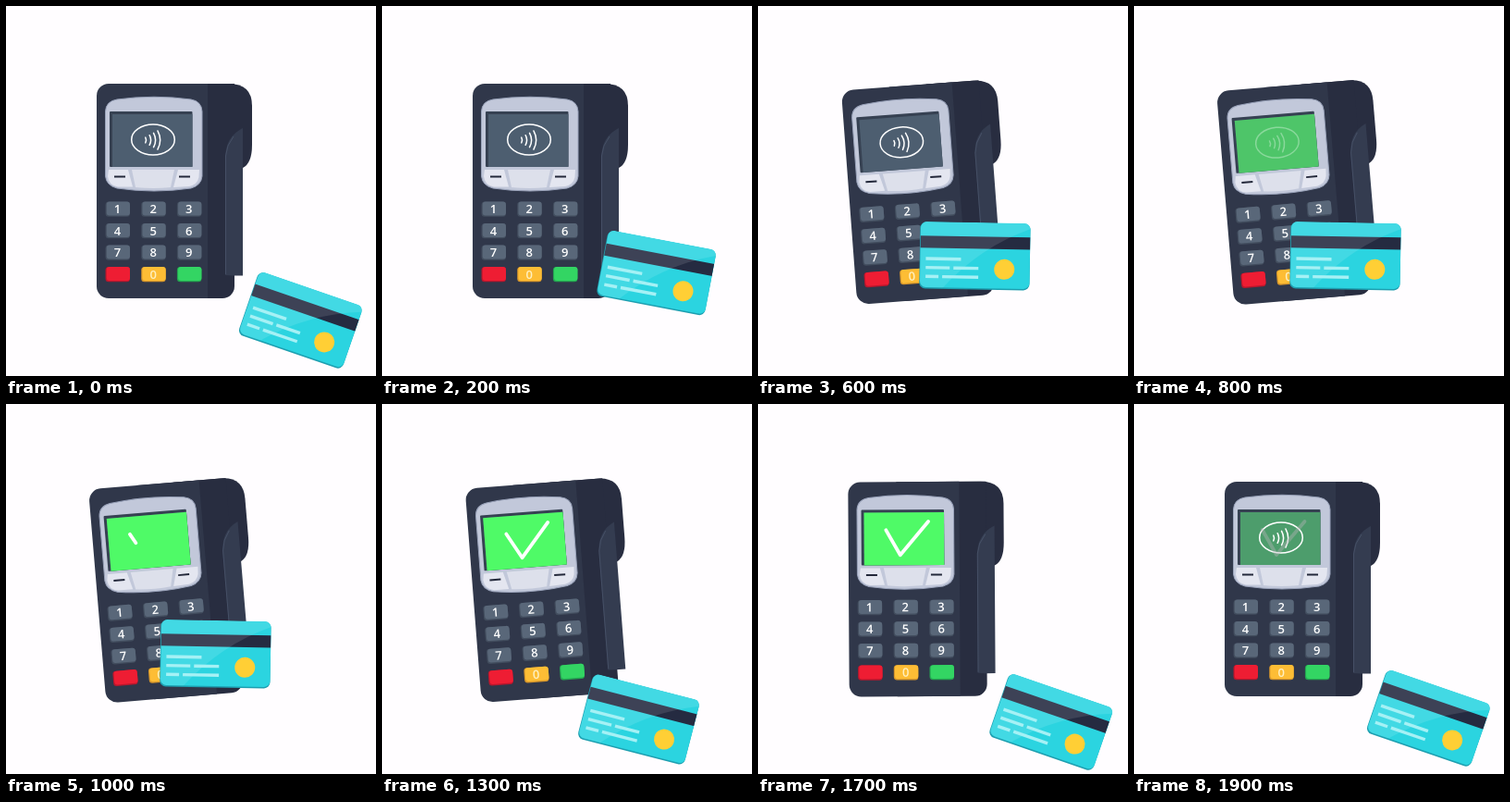
These frames come from a looping animation (400 by 400 pixels, 2000 ms). An HTML page with a canvas:

```html
<!DOCTYPE html>
<html lang="en">
<head>
<meta charset="utf-8">
<title>Card payment</title>
<style>
  html, body { margin: 0; width: 100%; height: 100%; overflow: hidden; background: #fffdff; }
  canvas { display: block; width: 400px; height: 400px; }
</style>
</head>
<body>
<canvas id="stage"></canvas>
<script>
const LOOP = 2000, STEP = 100;
const canvas = document.getElementById('stage');
const ctx = canvas.getContext('2d');
const ratio = window.devicePixelRatio || 1;
canvas.width = canvas.height = 400 * ratio;

const rad = deg => deg * Math.PI / 180;
const span = (t, from, to) => Math.max(0, Math.min(1, (t - from) / (to - from)));
const smooth = u => u * u * (3 - 2 * u);
const easeOut = (u, power) => 1 - (1 - u) ** power;
const mix = (a, b, u) => a + (b - a) * u;

// The card swings in, drifts left over the keypad, then drops back past its rest height
function cardPose(t) {
  if (t < 1000) {
    const u = span(t, 0, 600);
    return {
      x: mix(318.5, 234.5, smooth(u)) - 8 * smooth(span(t, 600, 900)),
      y: mix(339.5, 270, easeOut(u, 3.3)),
      angle: mix(19, 1, easeOut(u, 1.5))
    };
  }
  return {
    x: mix(226.5, 318.5, easeOut(span(t, 1050, 1800), 2)),
    y: mix(270, 339.5, smooth(span(t, 1000, 1300))) + 5 * Math.sin(Math.PI * span(t, 1250, 1900)),
    angle: mix(1, 19, easeOut(span(t, 1000, 1600), 2))
  };
}

const terminalTilt = t => -4.8 * (smooth(span(t, 200, 700)) - smooth(span(t, 1200, 1800)));

function box(x, y, w, h, r, fill) {
  ctx.beginPath();
  ctx.roundRect(x, y, w, h, r);
  ctx.fillStyle = fill;
  ctx.fill();
}

function shape(d, fill, edge) {
  const path = new Path2D(d);
  ctx.fillStyle = fill;
  ctx.fill(path);
  if (!edge) return;
  ctx.strokeStyle = edge;
  ctx.lineWidth = 1;
  ctx.stroke(path);
}

function line(points, color, width, cap = 'butt') {
  ctx.beginPath();
  points.forEach(([x, y]) => ctx.lineTo(x, y));
  ctx.strokeStyle = color;
  ctx.lineWidth = width;
  ctx.lineCap = cap;
  ctx.lineJoin = 'round';
  ctx.stroke();
}

function drawBody() {
  shape('M190 84H241Q266 84 266 108V150Q266 170 256 175H190Z', '#282d40');
  box(150, 84, 97, 232, [0, 0, 13, 0], '#282d40');
  box(98, 84, 120, 232, [13, 0, 0, 13], '#30374a');
  shape('M237 291V165Q237 141 256 132V291.5H246Z', '#343c50');
  line([[237.5, 290], [237.5, 162], [240, 151], [246, 141]], '#465066', 1);
}

function drawHousing() {
  shape('M107.5 114Q108 103 120 101Q160 95.5 200 101Q211.5 103 212 114V184Q211 194 200 197Q160 203 120 197Q108.5 194 107.5 184Z',
    '#c2c8da', '#9aa3ba');
  shape('M111 177H132L137 195.5H121Q111 194 110 184Z', '#e4e6f0');
  shape('M136 177H182L178 196Q160 198 140 196Z', '#dde0eb');
  shape('M186 177H209L208.5 185Q207 193 198 195L181 196Z', '#e4e6f0');
  for (const x of [117, 187]) line([[x, 184.5], [x + 12, 184.5]], '#23283a', 2);
}

function drawIcon(alpha) {
  ctx.globalAlpha = alpha;
  ctx.strokeStyle = '#fff';
  ctx.lineCap = 'round';
  ctx.lineWidth = 1.5;
  ctx.beginPath();
  ctx.ellipse(159, 144.5, 23.3, 16.4, 0, 0, 7);
  ctx.stroke();
  for (let i = 0; i < 4; i++) {
    ctx.beginPath();
    ctx.arc(145.5, 145, 6 + i * 5, -0.5, 0.5);
    ctx.stroke();
  }
  ctx.globalAlpha = 1;
}

function drawCheck(progress, alpha) {
  if (progress <= 0) return;
  const turn = 0.395;
  const down = Math.min(1, progress / turn), up = span(progress, turn, 1);
  const points = [[138.7, 136], [mix(138.7, 154, down), mix(136, 163, down)]];
  if (up > 0) points.push([mix(154, 184.5, up), mix(163, 127, up)]);
  ctx.globalAlpha = alpha;
  line(points, alpha < 1 ? '#b9b4b8' : '#fff', 3.8, 'round');
  ctx.globalAlpha = 1;
}

function drawScreen(t) {
  const green = t < 1000 ? span(t, 600, 900) : 1 - span(t, 1780, 1980);
  box(112, 114, 89.5, 60, 1, '#364152');
  box(115, 117, 86.5, 57, 0, '#4d5e70');
  ctx.globalAlpha = green;
  box(115, 117, 86.5, 57, 0, '#4ffa67');
  drawIcon(t < 1000 ? 1 - green : Math.min(1, 1.8 * (1 - green)));
  drawCheck(span(t, 950, 1295), green);
}

function drawKeys() {
  ctx.font = '600 13px "Open Sans", "Noto Sans", sans-serif';
  ctx.textAlign = 'center';
  const actions = [['#ee1d33', '#b8172d'], ['#fdbd35', '#d6962b'], ['#33d563', '#24a651']];
  for (let i = 0; i < 12; i++) {
    const col = i % 3, row = Math.floor(i / 3);
    const x = 107.5 + col * 38.7, y = 211.6 + row * 23.5;
    const [face, edge] = row === 3 ? actions[col] : ['#596779', '#424d5e'];
    box(x, y, 26.5, 16.2, 3.5, edge);
    box(x + 1.2, y, 25.3, 14.8, 3.2, face);
    ctx.fillStyle = row < 3 ? '#fff' : '#fff0c0';
    const label = row < 3 ? i + 1 : col === 1 ? 0 : '';
    ctx.fillText(label, x + 12.9, y + 12.4);
  }
}

function drawTerminal(t) {
  ctx.save();
  ctx.translate(194, 195);
  ctx.rotate(rad(terminalTilt(t)));
  ctx.translate(-194, -195);
  drawBody();
  drawHousing();
  drawScreen(t);
  drawKeys();
  ctx.restore();
}

function drawCard(t) {
  const { x, y, angle } = cardPose(t);
  ctx.save();
  ctx.translate(x, y);
  ctx.rotate(rad(angle));
  box(-59.7, -35.5, 119.2, 72, 6.5, '#1d9fb0');
  ctx.beginPath();
  ctx.roundRect(-59, -36, 118.5, 71, 6.5);
  ctx.clip();
  ctx.fillStyle = '#2bd4e0';
  ctx.fillRect(-60, -36, 120, 72);
  ctx.fillStyle = '#252b41';
  ctx.fillRect(-60, -20.8, 120, 13.2);
  shape('M-60 -36H60V-30Q6 -10 -35 36H-60Z', 'rgba(255,255,255,.11)');
  for (let row = 0; row < 3; row++) {
    const gap = -15 - 12 * row, dy = 4 + 9.6 * row;
    line([[-53, dy], [gap, dy]], '#a5f1f5', 3.4);
    if (row) line([[gap + 4, dy], [4, dy]], '#a5f1f5', 3.4);
  }
  ctx.beginPath();
  ctx.arc(32, 14.3, 11, 0, 7);
  ctx.fillStyle = '#ffcf35';
  ctx.fill();
  ctx.restore();
}

function draw(now) {
  const t = Math.floor(now % LOOP / STEP) * STEP;
  ctx.setTransform(ratio, 0, 0, ratio, 0, 0);
  ctx.fillStyle = '#fffdff';
  ctx.fillRect(0, 0, 400, 400);
  drawTerminal(t);
  drawCard(t);
}

const start = performance.now();
function tick() {
  draw(performance.now() - start);
  requestAnimationFrame(tick);
}
tick();
</script>
</body>
</html>
```
